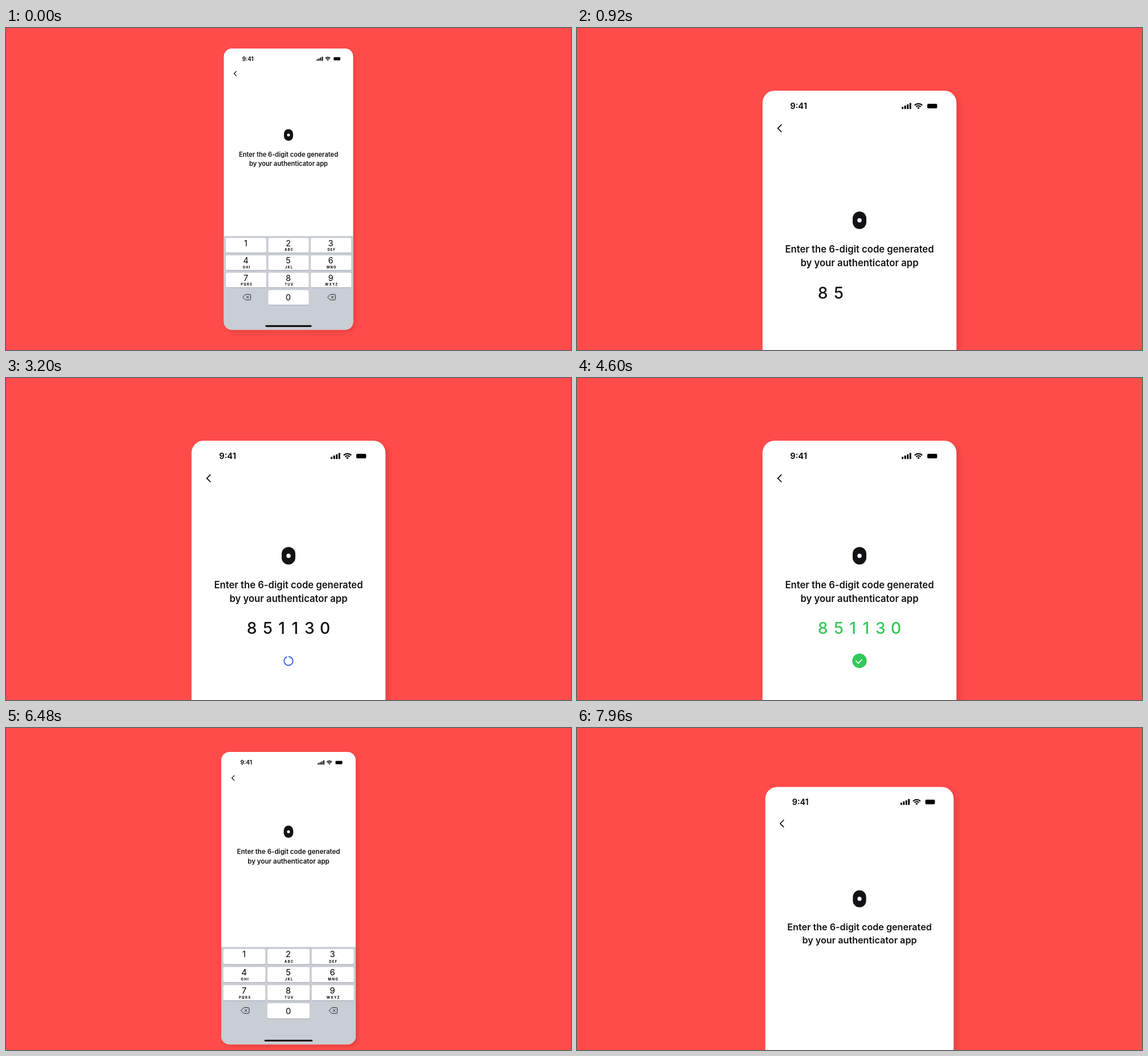
An HTML page with a canvas that plays this animation: 992 px wide and 565 px high, repeating every 8000 ms.

```html
<!DOCTYPE html>
<html lang="en">
<head>
<meta charset="utf-8">
<title>Six-digit code entry</title>
<style>
  html, body { margin: 0; width: 100%; height: 100%; overflow: hidden; background: #ff4b4a; }
  canvas { display: block; width: 992px; height: 565px; }
</style>
</head>
<body>
<canvas id="stage"></canvas>
<script>
const W = 992, H = 565, LOOP = 8000;
const INK = '#111214', GREEN = [52, 199, 89], BLUE = '#4a6df0';
const CARD = { w: 227, h: 493.5, r: 14 };
const CODE = '851130', CODE_X = [-43, -24.4, -7.9, 7.6, 24.5, 42.7];
const KEYS = ['', 'ABC', 'DEF', 'GHI', 'JKL', 'MNO', 'PQRS', 'TUV', 'WXYZ'];

const canvas = document.getElementById('stage');
const ctx = canvas.getContext('2d');
const dpr = window.devicePixelRatio || 1;
canvas.width = W * dpr;
canvas.height = H * dpr;

const clamp = v => Math.min(1, Math.max(0, v));
const span = (t, from, length) => clamp((t - from) / length);
const easeOut = p => 1 - (1 - p) ** 3;

// cubic-bezier(.5, 0, 0, 1), solved by bisection
function glide(x) {
  if (x <= 0 || x >= 1) return clamp(x);
  let lo = 0, hi = 1;
  for (let i = 0; i < 24; i++) {
    const u = (lo + hi) / 2;
    if (1.5 * u * (1 - u) ** 2 + u ** 3 < x) lo = u; else hi = u;
  }
  return lo * lo * (3 - 2 * lo);
}

function box(x, y, w, h, r, fill) {
  ctx.beginPath();
  ctx.roundRect(x, y, w, h, r);
  ctx.fillStyle = fill;
  ctx.fill();
}

function disc(x, y, r, fill) {
  ctx.beginPath();
  ctx.arc(x, y, r, 0, 2 * Math.PI);
  ctx.fillStyle = fill;
  ctx.fill();
}

function arc(x, y, r, from, to, width, color) {
  ctx.beginPath();
  ctx.arc(x, y, r, from, to);
  ctx.lineWidth = width;
  ctx.strokeStyle = color;
  ctx.stroke();
}

function line(points, width, color) {
  ctx.beginPath();
  points.forEach(([x, y]) => ctx.lineTo(x, y));
  ctx.lineWidth = width;
  ctx.strokeStyle = color;
  ctx.stroke();
}

// y is the middle of the capitals
function label(str, x, y, size, weight, color = INK, spacing = 0) {
  ctx.font = `${weight} ${size}px Inter, sans-serif`;
  ctx.letterSpacing = spacing + 'px';
  ctx.textAlign = 'center';
  ctx.fillStyle = color;
  ctx.fillText(str, x, y + size * 0.364);
}

function statusBar() {
  label('9:41', -71.3, 18, 9.8, 600, '#000');
  for (let i = 0; i < 4; i++) {
    const h = 2.6 + i * 1.53;
    box(49.4 + i * 3.04, 21.5 - h, 2, h, 0.6, '#000');
  }
  const left = -0.75 * Math.PI, right = -0.25 * Math.PI;
  arc(69, 21.5, 6.25, left, right, 1.5, '#000');
  arc(69, 21.5, 3.85, left, right, 1.4, '#000');
  arc(69, 21.5, 1.1, left, right, 2.2, '#000');
  ctx.beginPath();
  ctx.roundRect(78, 14, 14, 8, 2.4);
  ctx.lineWidth = 0.5;
  ctx.strokeStyle = 'rgba(0,0,0,.1)';
  ctx.stroke();
  box(79.3, 15.3, 11.6, 5.4, 1.4, '#000');
}

function backspace(x, y) {
  ctx.save();
  ctx.translate(x, y);
  ctx.lineJoin = ctx.lineCap = 'round';
  ctx.beginPath();
  ctx.moveTo(-6.8, 0);
  ctx.lineTo(-2.9, -4.3);
  ctx.quadraticCurveTo(-2.3, -4.9, -1.4, -4.9);
  ctx.arcTo(6.7, -4.9, 6.7, 0, 1.7);
  ctx.arcTo(6.7, 4.9, 0, 4.9, 1.7);
  ctx.lineTo(-1.4, 4.9);
  ctx.quadraticCurveTo(-2.3, 4.9, -2.9, 4.3);
  ctx.closePath();
  ctx.lineWidth = 0.9;
  ctx.strokeStyle = INK;
  ctx.stroke();
  line([[-0.5, -1.9], [3.3, 1.9]], 0.9, INK);
  line([[-0.5, 1.9], [3.3, -1.9]], 0.9, INK);
  ctx.restore();
}

function key(col, row, digit, letters) {
  const x = -110.2 + col * 74.6, y = 332.5 + row * 30.5;
  const mid = x + 35.6;
  box(x, y + 0.7, 71.3, 25.7, 2.8, '#8e9196');
  box(x, y, 71.3, 25.7, 2.8, '#fff');
  label(digit, mid - 0.4, y + (row < 3 ? 8.8 : 12.7), 14.3, 400, '#000');
  if (letters) label(letters, mid + 1.2, y + 20.8, 5.7, 700, '#000', 1.25);
}

function keypad() {
  ctx.fillStyle = '#c9cdd4';
  ctx.fillRect(-CARD.w / 2, 329, CARD.w, CARD.h - 329);
  KEYS.forEach((letters, i) => key(i % 3, Math.floor(i / 3), String(i + 1), letters));
  key(1, 3, '0');
  backspace(-73.2, 436.3);
  backspace(75.6, 436.3);
  box(-40.6, 485.6, 81.2, 2.9, 1.45, '#000');
}

function prompt(t) {
  box(-8, 141.4, 16, 20.5, 8, INK);
  disc(0, 151.65, 2.5, '#fff');
  label('Enter the 6-digit code generated', 0, 185.6, 11.1, 600);
  label('by your authenticator app', 0, 201.5, 11.1, 600);

  const p = span(t, 4120, 360);
  const color = `rgb(${[17, 18, 20].map((c, i) => Math.round(c + (GREEN[i] - c) * p))})`;
  const typed = Math.floor((t - 800) / 100) + 1;
  ctx.globalAlpha = 1 - span(t, 6040, 260);
  CODE_X.slice(0, Math.max(0, typed)).forEach((x, i) =>
    label(CODE[i], x, 236.4, 18.8, 500, color));
  ctx.globalAlpha = 1;
}

function spinner(t) {
  const head = span(t, 2400, 840), tail = span(t, 3240, 840);
  if (head <= tail) return;
  const turn = p => (p * 2 - 0.5) * Math.PI;
  arc(0, 257.7, 5.1, turn(tail), turn(head), 1.45, BLUE);
}

function success(t) {
  const grow = easeOut(span(t, 4120, 440));
  const alpha = 1 - span(t, 6040, 260);
  if (!grow || !alpha) return;
  ctx.save();
  ctx.translate(0, 257.5);
  ctx.scale(grow, grow);
  ctx.globalAlpha = alpha;
  disc(0, 0, 8.45, `rgb(${GREEN})`);
  const draw = easeOut(span(t, 4400, 440));
  if (draw) {
    ctx.setLineDash([11.4 * draw, 20]);
    ctx.lineJoin = ctx.lineCap = 'round';
    line([[-4, 0.3], [-1.4, 2.9], [4, -2.7]], 1.15, '#fff');
  }
  ctx.restore();
}

function render(t) {
  const zoom = glide(span(t, 0, 800)) - glide(span(t, 6000, 800)) + glide(span(t, 7490, 800));
  const s = 1 + zoom / 2;
  const lift = 17 * glide(span(t, 1600, 800));

  ctx.setTransform(dpr, 0, 0, dpr, 0, 0);
  ctx.fillStyle = '#ff4b4a';
  ctx.fillRect(0, 0, W, H);
  ctx.translate(W / 2, 36 + 74 * zoom);
  ctx.scale(s, s);

  ctx.save();
  ctx.shadowColor = 'rgba(0,0,0,.11)';
  ctx.shadowBlur = 6 * s * dpr;
  ctx.shadowOffsetX = ctx.shadowOffsetY = 4 * s * dpr;
  box(-CARD.w / 2, 0, CARD.w, CARD.h, CARD.r, '#fff');
  ctx.restore();

  ctx.save();
  ctx.beginPath();
  ctx.roundRect(-CARD.w / 2, 0, CARD.w, CARD.h, CARD.r);
  ctx.clip();
  statusBar();
  line([[-91.2, 39.6], [-95.6, 44], [-91.2, 48.4]], 1.2, INK);
  keypad();
  ctx.save();
  ctx.translate(0, -lift);
  prompt(t);
  ctx.restore();
  spinner(t);
  success(t);
  ctx.restore();
}

const start = performance.now();
function tick() {
  render((performance.now() - start) % LOOP);
  requestAnimationFrame(tick);
}
tick();
</script>
</body>
</html>
```
